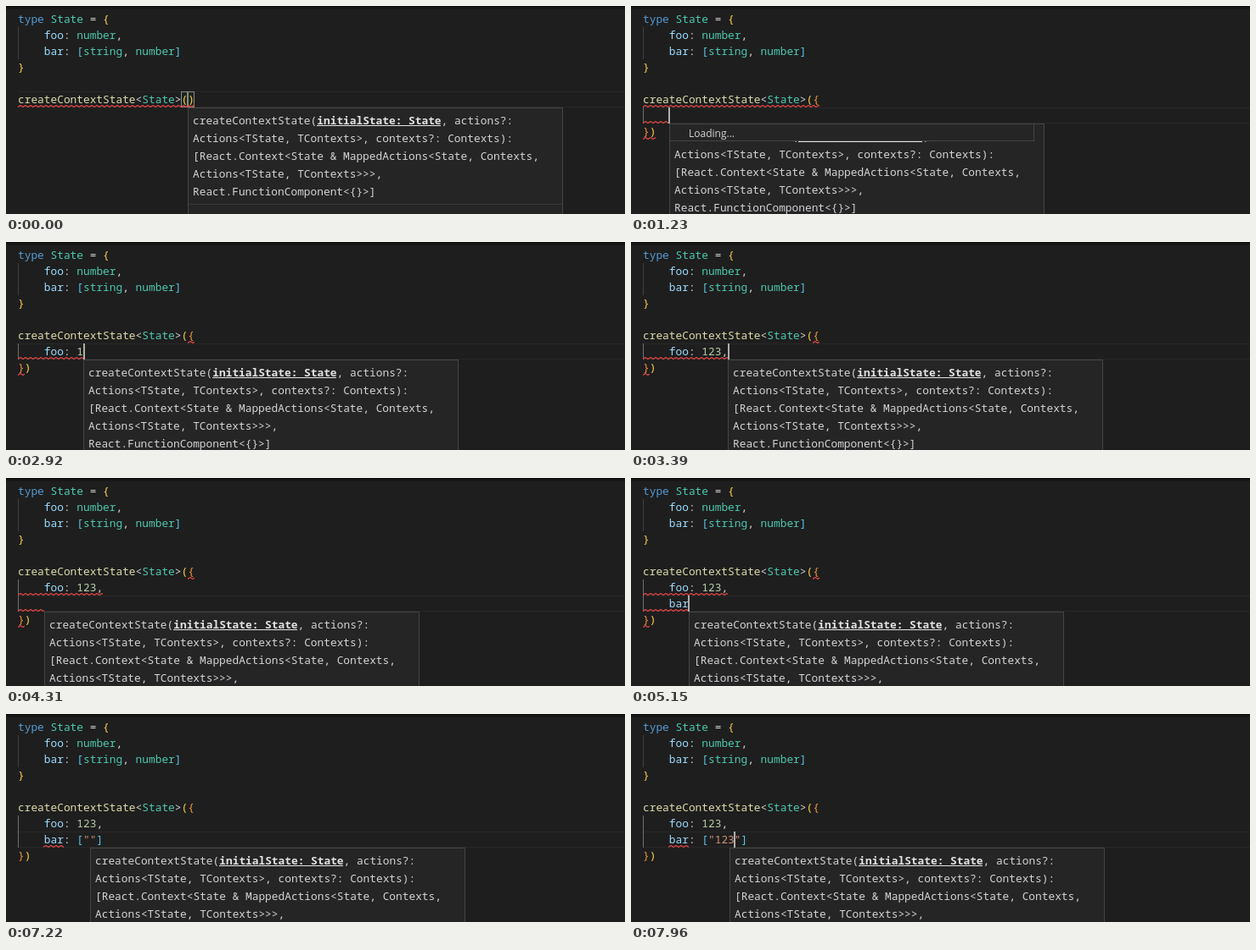
Recreate the animation shown at these times as an HTML page with a canvas. Size 729 by 246 pixels, loop 8000 ms.

```html
<!DOCTYPE html>
<html lang="en">
<head>
<meta charset="utf-8">
<title>Typed state in the editor</title>
<style>
  html, body { margin: 0; width: 100%; height: 100%; overflow: hidden; background: #1e1e1e; }
  canvas { display: block; }
</style>
</head>
<body>
<canvas id="stage" width="729" height="246"></canvas>
<script>
const ctx = document.getElementById('stage').getContext('2d');
const W = 729, H = 246, LOOP = 8000;
const LEFT = 14, TOP = 6, ROW = 19, CHAR = 7.7;
const MONO = '12.8333px "Noto Sans Mono", monospace';
const UI = '12px "Open Sans", sans-serif';
const HINT_W = 442, HINT_LINE = 21, LIST_W = 430, SLIDE = 30;

const C = {
  bg: '#1e1e1e', text: '#d4d4d4', line: '#282828', panel: '#252526', border: '#454545',
  keyword: '#569cd6', type: '#4ec9b0', prop: '#9cdcfe', call: '#dcdcaa',
  number: '#b5cea8', string: '#ce9178', error: '#f04848',
  gold: '#ffd24a', orange: '#f0983e', sky: '#5cc8e8'
};

const HEADER = ['type State = {', '    foo: number,', '    bar: [string, number]', '}', ''];
const CALL = 'createContextState<State>';

// Every edit: time and the call's arguments, with | for the caret.
const edits = [];
const edit = (time, body) => edits.push({ time, body });
const typeText = (times, text, wrap) =>
  times.forEach((time, i) => edit(time, wrap(text.slice(0, i + 1) + '|')));

const inObject = s => '({\n    ' + s + '\n})';
const inBar = s => inObject('foo: 123,\n    bar' + s);
edit(-465, '(|)');
edit(480, '({|})');
edit(970, inObject('|'));
edit(1790, inObject('foo|'));
typeText([2600, 2740, 2880, 3000, 3120, 3360], ': 123,', s => inObject('foo' + s));
edit(3780, inObject('foo: 123,\n    |'));
edit(5080, inBar('|'));
typeText([5850, 6020], ': ', inBar);
edit(6570, inBar(': [|]'));
edit(6760, inBar(': ["|"]'));
typeText([7640, 7800, 7960], '123', s => inBar(': ["' + s + '"]'));

for (const e of edits) {
  const rows = (CALL + e.body).split('\n');
  const i = rows.findIndex(r => r.includes('|'));
  e.row = HEADER.length + i;
  e.col = rows[i].indexOf('|');
  e.pair = /[({[]\|[)}\]]/.test(rows[i]);
  e.lines = HEADER.concat(rows.map(r => r.replace('|', '')));
}

const LONG_HINT = [', actions?:', 'Actions<TState, TContexts>, contexts?: Contexts):',
  '[React.Context<State & MappedActions<State, Contexts,', 'Actions<TState, TContexts>>>,',
  'React.FunctionComponent<{}>]'];
const SHORT_HINT = [', actions?: {},', 'contexts?: {}): [React.Context<State &',
  'MappedActions<State, {}, {}>>,', 'React.FunctionComponent<{}>]'];
const SNIPPETS = ['class', 'ctor', 'dowhile', 'error', 'for'];
const DETAILS = { foo: '(property) foo: number', bar: '(property) bar: [string, number]' };

const colX = col => LEFT + col * CHAR;
const rowY = row => TOP + row * ROW;

function rect(x, y, w, h, color) {
  ctx.fillStyle = color;
  ctx.fillRect(x, y, w, h);
}

function frame(x, y, w, h, color) {
  ctx.strokeStyle = color;
  ctx.lineWidth = 1;
  ctx.strokeRect(x + .5, y + .5, w - 1, h - 1);
}

function write(text, x, y, color, font = MONO) {
  ctx.font = font;
  ctx.fillStyle = color;
  ctx.fillText(text, x, y);
}

function tokenColor(token, row, plainBrackets) {
  if (token[0] === '"') return C.string;
  if (/^\d/.test(token)) return C.number;
  if (token === 'type') return C.keyword;
  if (/^(State|string|number)$/.test(token)) return C.type;
  if (/^(foo|bar)$/.test(token)) return C.prop;
  if (token === 'createContextState') return C.call;
  if (/[[\]]/.test(token)) return plainBrackets && row > 4 ? C.text : C.sky;
  if (/[{}]/.test(token)) return row > 4 ? C.orange : C.gold;
  if (/[()]/.test(token)) return C.gold;
  return C.text;
}

function drawCode(lines, plainBrackets) {
  lines.forEach((line, row) => {
    for (const m of line.matchAll(/"[^"]*"|\w+|[^\w\s]/g))
      write(m[0], colX(m.index), rowY(row) + 14, tokenColor(m[0], row, plainBrackets));
  });
}

function squiggle(row, from, to) {
  const x0 = Math.floor(colX(from)), x1 = Math.round(colX(to)), y = rowY(row) + 16;
  ctx.save();
  ctx.beginPath();
  ctx.rect(x0, y, x1 - x0, 3);
  ctx.clip();
  ctx.beginPath();
  for (let x = x0, i = 0; x <= x1 + 3; x += 3, i++) ctx.lineTo(x, y + (i % 2 ? .5 : 2.5));
  ctx.strokeStyle = C.error;
  ctx.lineWidth = 1.1;
  ctx.stroke();
  ctx.restore();
}

function drawErrors(t, lines) {
  const full = row => squiggle(row, 0, lines[row].length);
  if (t < 1500) {
    for (let row = 5; row < lines.length; row++) full(row);
  } else if (t < 5610) {
    squiggle(5, 26, 27);
    full(6);
    if (t >= 4310) full(7);
    squiggle(lines.length - 1, 0, 1);
  } else {
    squiggle(7, 4, 7);
    if (t >= 6370 && t < 6690) squiggle(8, 0, 1);
  }
}

function drawHint(x, y, lines) {
  rect(x, y, HINT_W, H, C.panel);
  frame(x, y, HINT_W, H, C.border);
  const tx = x + 6, base = y + 20;
  const name = 'createContextState(', param = 'initialState: State';
  const px = tx + name.length * CHAR, pw = param.length * CHAR;
  write(name, tx, base, C.text);
  write(param, px, base, '#e4e4e4', 'bold ' + MONO);
  rect(Math.round(px), base + 1, Math.round(pw), 1, '#e4e4e4');
  write(lines[0], px + pw, base, C.text);
  lines.slice(1).forEach((s, i) => write(s, tx, base + (i + 1) * HINT_LINE, C.text));
  rect(x + 1, y + 9 + lines.length * HINT_LINE, HINT_W - 2, 1, '#3a3a3b');
}

function drawLoading(x, y) {
  rect(x, y, LIST_W, 21, C.panel);
  frame(x, y, LIST_W, 21, C.border);
  write('Loading...', x + 23, y + 16, C.text, UI);
}

function drawList(x, y, items, selected, detailed) {
  rect(x, y, LIST_W, H, C.panel);
  frame(x, y, LIST_W, H, C.border);
  items.forEach((item, i) => {
    const top = y + 1 + i * ROW, isProp = item in DETAILS;
    if (i === selected) rect(x + 1, top, LIST_W - 2, ROW, '#062f4a');
    if (isProp) rect(x + 6, top + 6, 10, 7, '#75beff');
    else frame(x + 6, top + 5, 10, 9, '#c5c5c5');
    write(item, x + 23, top + 14, C.text);
    if (i === selected && detailed) {
      const s = DETAILS[item];
      write(s, x + LIST_W - 26 - s.length * CHAR, top + 14, '#9da5ab');
    }
  });
}

function drawWidgets(t, e, previous) {
  const y = rowY(e.row + 1);
  const sliding = previous && t - e.time < SLIDE;
  const from = colX((previous || e).col), to = colX(e.col);
  const x = Math.round(sliding ? from + (to - from) * .25 : to);
  drawHint(x, y, t >= 5920 && t < 6690 ? SHORT_HINT : LONG_HINT);
  if (t >= 1230 && t < 1330) drawLoading(45, y);
  if (t >= 1330 && t < 1790)
    drawList(45, y, ['bar', 'foo', ...SNIPPETS], t < 1640 ? 0 : 1, t >= 1430);
  if (t >= 4770 && t < 5080) drawList(45, y, ['bar', ...SNIPPETS], 0, true);
}

function draw(t) {
  const n = edits.findLastIndex(e => e.time <= t), e = edits[n];
  const age = t - e.time, y = rowY(e.row);
  rect(0, 0, W, H, C.bg);

  rect(LEFT, y, W - LEFT, 1, C.line);
  rect(LEFT, y + ROW - 1, W - LEFT, 1, C.line);
  rect(LEFT, rowY(1), 1, ROW * 2, '#404040');
  if (e.row > 5) rect(LEFT, rowY(6), 1, ROW * (e.row - 5), '#707070');

  if (e.pair && age >= 50) {
    for (const col of [e.col - 1, e.col]) {
      const x = Math.floor(colX(col));
      rect(x, y, 8, ROW, 'rgba(0,100,0,.1)');
      frame(x, y, 8, ROW, '#888');
    }
  }

  drawErrors(t, e.lines);
  drawCode(e.lines, age < 60 && e.pair);
  if (Math.floor((age + 30) / 490) % 2 === 0)
    rect(Math.floor(colX(e.col)), y, 2, ROW, '#aeafad');
  drawWidgets(t, e, edits[n - 1]);

  const shade = ctx.createLinearGradient(0, 0, 0, 5);
  shade.addColorStop(0, 'rgba(0,0,0,.55)');
  shade.addColorStop(1, 'rgba(0,0,0,0)');
  rect(0, 0, W, 5, shade);
}

const start = performance.now();
function tick() {
  draw((performance.now() - start) % LOOP);
  requestAnimationFrame(tick);
}
tick();
</script>
</body>
</html>
```
